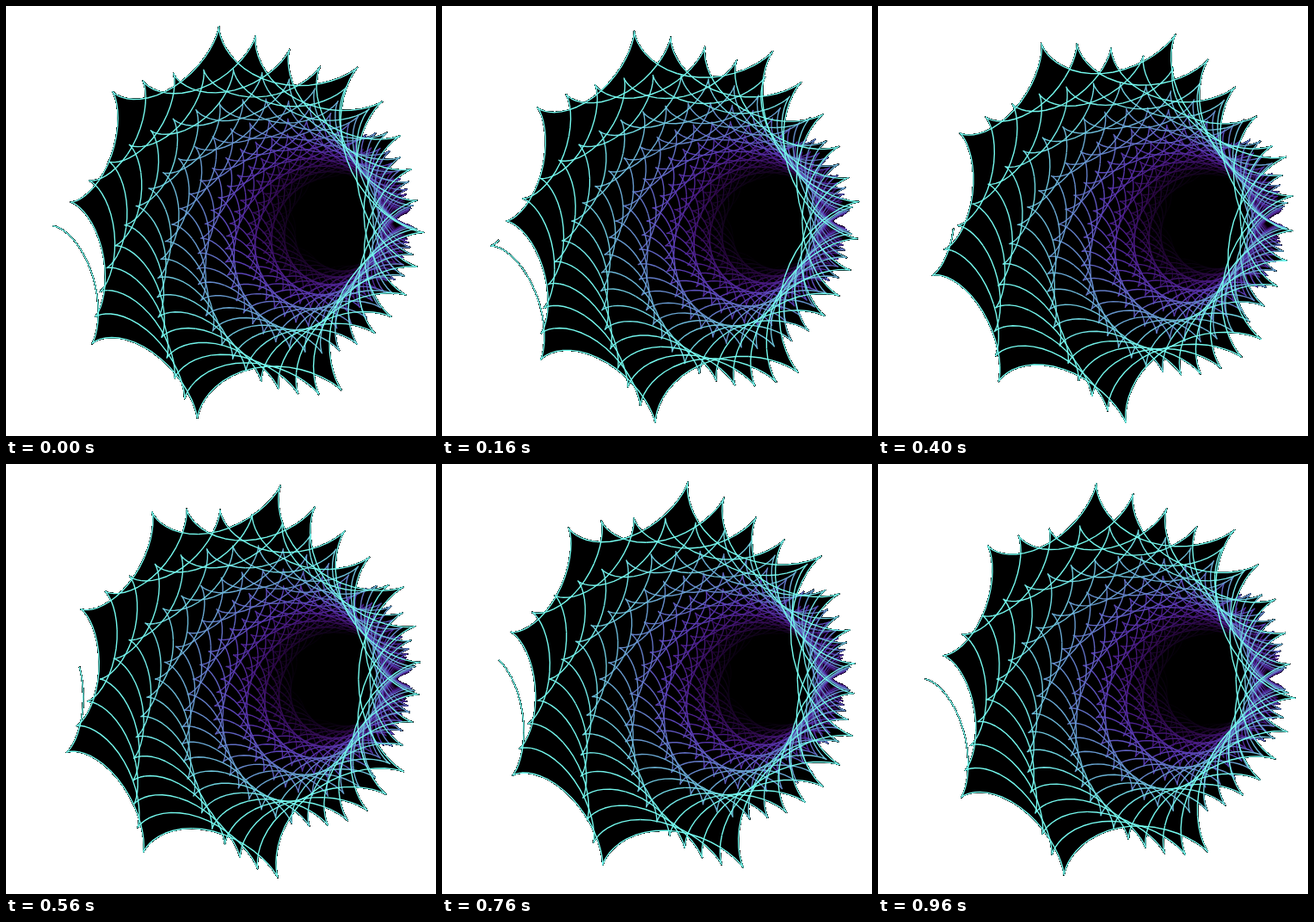
An HTML page with a canvas for the animation above (1000 ms loop, 500 by 500 pixels).

```html
<!DOCTYPE html>
<html>
<head>
<meta charset="utf-8">
<style>
html, body { margin: 0; height: 100%; overflow: hidden; background: #fff; }
canvas { display: block; width: 500px; height: 500px; }
</style>
</head>
<body>
<canvas id="stage" width="500" height="500"></canvas>
<script>
const SIZE = 500, FRAMES = 25, STEP_MS = 40;
const CUSPS = 8.2;            // cusps per turn of the coil
const TURNS = 38, PER_TURN = 180, CHUNK = 9;
const TAU = 2 * Math.PI;
const ctx = document.getElementById('stage').getContext('2d', { willReadFrequently: true });

// [turn, r, g, b]: the line darkens with depth
const SHADES = [
  [0, 118, 255, 242], [4.5, 114, 242, 234], [7.5, 108, 190, 216], [11, 100, 138, 202],
  [16.5, 90, 64, 182], [22, 74, 28, 134], [28, 44, 9, 70], [38, 0, 0, 0]
];

function shade(turn) {
  let i = 1;
  while (i < SHADES.length - 1 && SHADES[i][0] < turn) i++;
  const a = SHADES[i - 1], b = SHADES[i], u = (turn - a[0]) / (b[0] - a[0]);
  return `rgb(${[1, 2, 3].map(c => Math.round(a[c] + (b[c] - a[c]) * u))})`;
}

// Hypocycloid coil on a tilted tube, seen in perspective
function point(turn, lead) {
  const s = turn * TAU, r = 1 / CUSPS;
  const a = Math.PI + s, b = a + CUSPS * (lead - s);
  const x = (1 - r) * Math.cos(a) + r * Math.cos(b);
  const y = (1 - r) * Math.sin(a) + r * Math.sin(b);
  const scale = 233.5 / (1 - 0.235 * x + 0.064 * turn);
  return [250 + scale * (0.905 * x - 0.128 + 0.0572 * turn), 250 - scale * y];
}

function drawCoil(lead) {
  ctx.fillStyle = '#000';
  ctx.fillRect(0, 0, SIZE, SIZE);
  ctx.lineWidth = 1.4;
  ctx.lineJoin = 'round';
  for (let i = TURNS * PER_TURN - CHUNK; i >= 0; i -= CHUNK) {
    ctx.strokeStyle = shade(i / PER_TURN);
    ctx.beginPath();
    for (let j = 0; j <= CHUNK; j++) ctx.lineTo(...point((i + j) / PER_TURN, lead));
    ctx.stroke();
  }
}

// Whiten the black area connected to the corner
function clearOutside(img) {
  const px = img.data, stack = [0];
  const dark = p => px[4 * p] + px[4 * p + 1] + px[4 * p + 2] < 40;
  while (stack.length) {
    const p = stack.pop();
    if (!dark(p)) continue;
    px.fill(255, 4 * p, 4 * p + 4);
    const x = p % SIZE;
    if (x > 0) stack.push(p - 1);
    if (x < SIZE - 1) stack.push(p + 1);
    if (p >= SIZE) stack.push(p - SIZE);
    if (p < SIZE * (SIZE - 1)) stack.push(p + SIZE);
  }
  return img;
}

const cache = [];
function render(i) {
  drawCoil(TAU * (0.005 + i / FRAMES / CUSPS));
  return clearOutside(ctx.getImageData(0, 0, SIZE, SIZE));
}

let shown = -1;
function tick(now) {
  const i = Math.floor(now / STEP_MS) % FRAMES;
  if (i !== shown) {
    cache[i] = cache[i] || render(i);
    ctx.putImageData(cache[i], 0, 0);
    shown = i;
  }
  requestAnimationFrame(tick);
}
requestAnimationFrame(tick);
</script>
</body>
</html>
```
